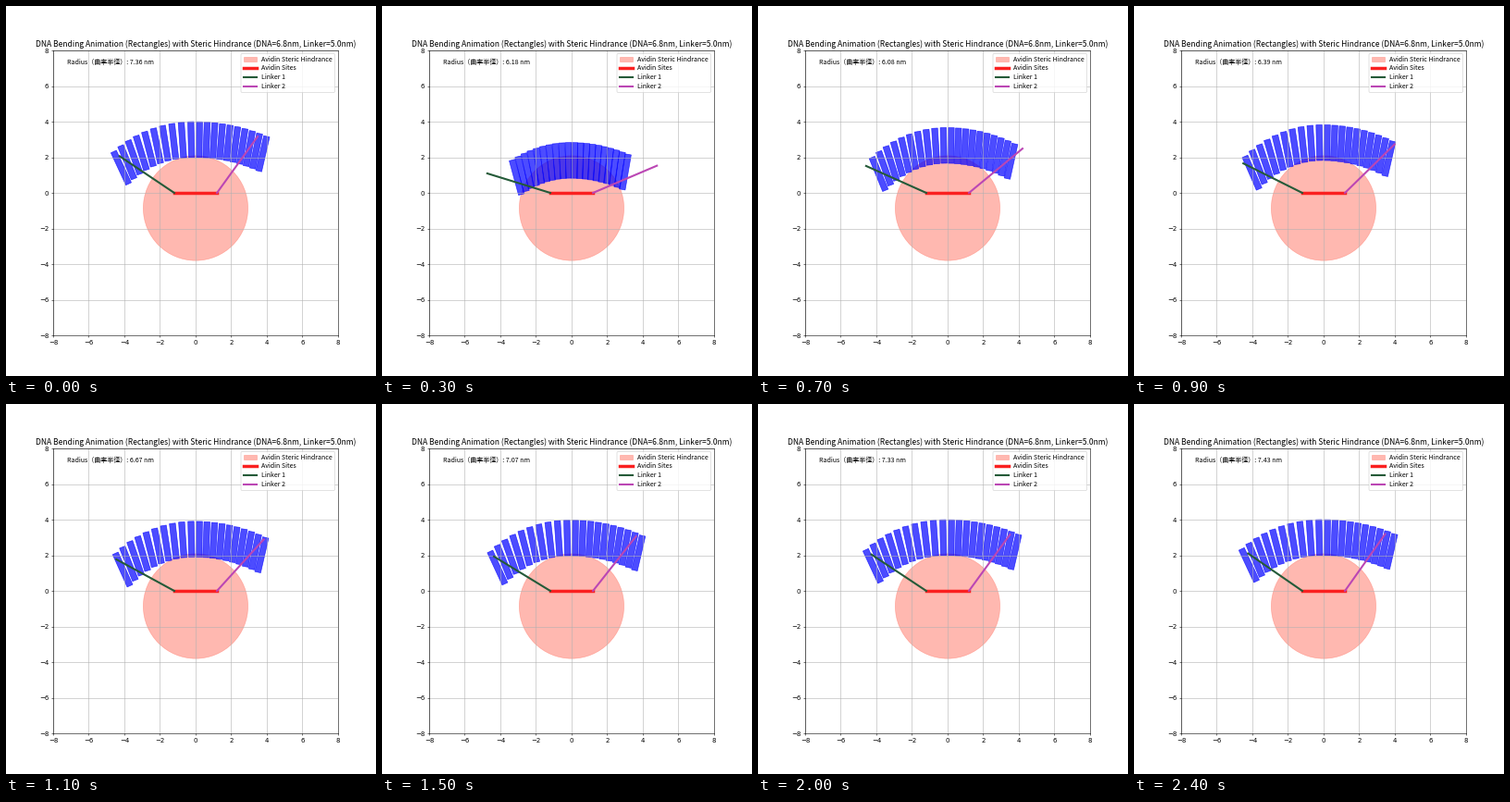
A matplotlib script that plays this animation: 400x400 px, repeating every 2.5 s.

```python
import numpy as np
import matplotlib.pyplot as plt
from matplotlib.animation import FuncAnimation
from matplotlib.lines import Line2D
from matplotlib.patches import Circle, FancyBboxPatch, Rectangle
from matplotlib.transforms import Affine2D

plt.rcParams["font.family"] = ["Noto Sans CJK JP", "DejaVu Sans"]

FRAMES = 25
OPENING = 21  # the loop opens on a nearly settled pose, then restarts
N_RECT, WIDTH, HEIGHT = 20, 0.34, 2.0
SITE = 1.2
SIZE = 10.15
PINK, RED, GREEN, PURPLE = "#ff7e6f", "#fa2020", "#245a38", "#bb46b4"


def relax(step, start, end, tau):
    """Exponential approach from start to end."""
    return end + (start - end) * np.exp(-step / tau)


def arc(t, span, bend, sag):
    """Offsets along one half of the bent strand, evenly spaced in angle."""
    x = span * np.sin(bend * t) / np.sin(bend)
    drop = sag * span * np.tan(bend / 2)
    return x, drop * (1 - np.cos(bend * t)) / (1 - np.cos(bend))


def radius(step):
    return 7.55 - 5.04 * np.exp(-step / 6.4) + 8.65 * np.exp(-step / 1.9)


fig = plt.figure(figsize=(8, 8), dpi=50)
# the tiny offset settles which way half-pixel grid lines snap
ax = fig.add_axes([0.1275 - 2e-5, 0.11 - 2e-5, 0.77, 0.77])
ax.set_xlim(-8, 8)
ax.set_ylim(-8, 8)
ax.grid(True)
ax.tick_params(labelfontfamily="DejaVu Sans")
ax.set_title("DNA Bending Animation (Rectangles) with Steric Hindrance "
             "(DNA=6.8nm, Linker=5.0nm)", fontsize=12.25)

ax.add_patch(Circle((0, -0.86), 2.94, color=PINK, alpha=0.55))
rects = [ax.add_patch(Rectangle((0, 0), WIDTH, HEIGHT, color="blue", alpha=0.7))
         for _ in range(N_RECT)]
ax.plot([-SITE, SITE], [0, 0], color=RED, lw=5)
linker1, = ax.plot([], [], color=GREEN, lw=3)
linker2, = ax.plot([], [], color=PURPLE, lw=3)
label = ax.text(0.05, 0.95, "", transform=ax.transAxes, fontsize=SIZE)


def draw_legend():
    px = Affine2D().scale(1 / 400, -1 / 400).translate(0, 1) + fig.transFigure
    fig.add_artist(FancyBboxPatch(
        (254, 51.5), 101.6, 42, boxstyle="round,pad=0,rounding_size=1.4",
        fc="white", ec="0.8", alpha=0.8, transform=px))
    fig.add_artist(Rectangle((256.9, 54.6), 13.9, 4.9, color=PINK,
                             alpha=0.55, transform=px))
    rows = [("Avidin Steric Hindrance", None, 0), ("Avidin Sites", RED, 5),
            ("Linker 1", GREEN, 3), ("Linker 2", PURPLE, 3)]
    for i, (name, color, lw) in enumerate(rows):
        y = 57.1 + 9.83 * i
        if color:
            fig.add_artist(Line2D([256.9, 270.8], [y, y], color=color, lw=lw,
                                  transform=px))
        fig.text(276.3, y + 2.4, name, fontsize=SIZE, transform=px)


def place_linker(line, side, length, degrees):
    a = np.radians(degrees)
    line.set_data([side * SITE, side * (SITE + length * np.cos(a))],
                  [0, length * np.sin(a)])


def update(frame):
    step = frame or OPENING
    base = relax(step, -1, 2, 3.2)
    sag = relax(step, 1.39, 0.81, 11)
    left = relax(step, 1.35, 3.75, 3.2), relax(step, 0, 25, 3.2)
    right = relax(step, 1.75, 3.55, 3.2), relax(step, 0, 13, 2.2)
    for rect, t in zip(rects, np.linspace(-1, 1, N_RECT)):
        span, tilt = left if t < 0 else right
        x, drop = arc(t, span, np.radians(2 * tilt), sag)
        rect.set_xy((x - WIDTH / 2, base - drop))
        rect.set_angle(-tilt * t)
    place_linker(linker1, -1, 3.7, relax(step, 9.5, 36.5, 9))
    place_linker(linker2, 1, 3.9, relax(step, 0, 55.5, 5.6))
    label.set_text(f"Radius（曲率半径）: {radius(step):.2f} nm")
    return [*rects, linker1, linker2, label]


draw_legend()
ani = FuncAnimation(fig, update, frames=FRAMES, interval=100, repeat=True)
plt.show()
```
